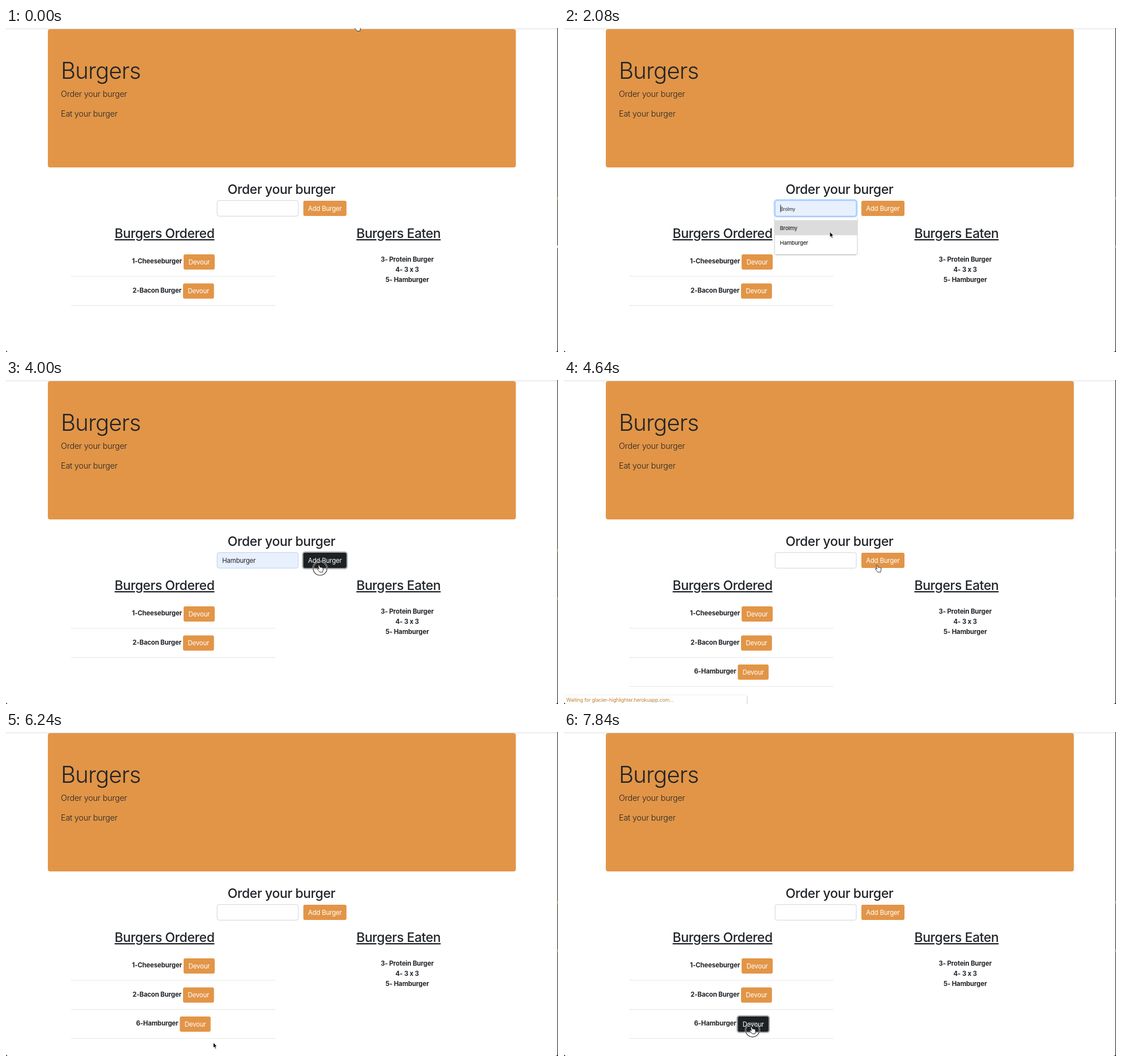
These frames come from a looping animation (976x574 px, 8000 ms). An HTML page:

```html
<!DOCTYPE html>
<html lang="en">
<head>
<meta charset="utf-8">
<title>Burgers</title>
<style>
html, body { margin: 0; width: 976px; height: 574px; overflow: hidden; background: #fff; }
svg { display: block; }
text { font: 400 11.5px Inter, "Open Sans", sans-serif; font-optical-sizing: none; letter-spacing: -.02em; fill: #212529; white-space: pre; }
.title { font-size: 40.3px; font-weight: 300; }
.lead { font-size: 14.4px; font-weight: 300; letter-spacing: -.013em; }
.head { font-size: 23.1px; font-weight: 500; }
.under { text-decoration: underline; }
.bold { font-weight: 700; letter-spacing: -.013em; }
.item { font-size: 9.6px; font-weight: 500; }
.status { font-size: 8.8px; fill: #c07f35; }
.mid { text-anchor: middle; }
.end { text-anchor: end; }
.button rect { fill: #e29547; }
.button text { fill: #fff; }
.button .glow { fill: none; stroke: #52585d; stroke-opacity: 0; stroke-width: 2.4; }
.button.focus .glow { stroke-opacity: .5; }
.button.down .face { fill: #1d2124; }
.box { fill: #fff; stroke: #ced4da; }
.box.filled { fill: #e8f0fe; stroke: #bdd2ee; }
.box.focus { stroke: #80bdff; }
</style>
</head>
<body>
<svg id="stage" width="976" height="574" viewBox="0 0 976 574"></svg>
<script>
const LOOP = 8000, STEP = 160;
const stage = document.getElementById("stage");
const $ = id => document.getElementById(id);

const text = (x, y, cls, str, id = "") => `<text id="${id}" x="${x}" y="${y}" class="${cls}">${str}</text>`;
const rect = (x, y, w, h, attrs = "") => `<rect x="${x}" y="${y}" width="${w}" height="${h}" ${attrs}/>`;

const buttons = {
  add: [525.7, 306, 76.3, 27, "Add Burger"],
  devour1: [314, 401, 55, 27, "Devour"],
  devour2: [313, 452.5, 54.7, 27, "Devour"],
  devour6: [307.3, 504, 54.5, 27, "Devour"]
};
const button = id => {
  const [x, y, w, h, label] = buttons[id];
  return `<g id="${id}" class="button">
    ${rect(x - 1, y - 1, w + 2, h + 2, 'rx="4" class="glow"')}
    ${rect(x, y, w, h, 'rx="3" class="face"')}
    ${text(x + w / 2, y + 17.7, "mid", label)}</g>`;
};
const row = (num, name, y) => {
  const id = "devour" + num;
  return `<g id="row${num}">${text(buttons[id][0] - 2.8, y + 16, "bold end", num + "-" + name)}
    ${button(id)}${rect(115, y + 38.5, 361, 1, 'fill="#e5e5e5"')}</g>`;
};

stage.innerHTML = `
  <defs><filter id="soft" x="-10%" y="-20%" width="120%" height="150%">
    <feDropShadow dx="0" dy="1" stdDeviation="1.6" flood-opacity=".4"/></filter></defs>
  ${rect(0, 0, 976, 574, 'fill="#fff"')}
  ${rect(0, 1, 976, 1, 'fill="#dedede"')}
  ${rect(74, 2, 827.5, 245, 'rx="4" fill="#e29547"')}
  ${text(97, 90, "title", "Burgers")}
  ${text(97, 122.3, "lead", "Order your burger")}
  ${text(97, 156.8, "lead", "Eat your burger")}
  ${text(487, 294, "head mid", "Order your burger")}
  ${rect(371.8, 304.3, 146.4, 30.4, 'id="halo" rx="5" fill="none" stroke="#bfdeff" stroke-width="2.4"')}
  ${rect(373.2, 305.7, 143.6, 27.6, 'id="box" rx="3.5"')}
  ${text(382.3, 324, "", "", "value")}
  ${rect(0, 313, 1, 13.5, 'id="caret" fill="#222"')}
  ${button("add")}
  ${text(280.3, 372, "head under mid", "Burgers Ordered")}
  ${text(694, 372, "head under mid", "Burgers Eaten")}
  ${row(1, "Cheeseburger", 401)}
  ${row(2, "Bacon Burger", 452.5)}
  ${row(6, "Hamburger", 504)}
  ${["3- Protein Burger", "4- 3 x 3", "5- Hamburger"].map((s, i) => text(709.3, 414.2 + 18 * i, "bold mid", s)).join("")}
  <g id="menu">
    ${rect(373, 335.5, 145, 65, 'rx="2" fill="#fff" filter="url(#soft)"')}
    ${rect(373, 340.5, 145, 26.7, 'id="mark" fill="#dcdcdc"')}
    ${text(381.7, 357.5, "item", "Brolmy")}
    ${text(381.7, 384.3, "item", "Hamburger")}
  </g>
  <g id="status">
    ${rect(-4, 558.5, 327, 20, 'rx="2" fill="#fff" filter="url(#soft)"')}
    ${text(4, 569.5, "status", "Waiting for glacier-highlighter.herokuapp.com...")}
  </g>
  ${rect(975, 0, 1, 574, 'fill="#16181a"')}
  ${rect(974, 299.5, 2, 4.5, 'fill="#e2a565"')}
  ${rect(974, 385.5, 2, 4, 'id="tick"')}
  <path d="M0 570Q0 574 4 574H0ZM976 569Q976 574 971 574H976Z"/>
  <g id="cursor">
    <g id="ring" fill="none">
      <circle cx="2.3" cy="5.7" r="12.3" stroke="#fff" stroke-opacity=".7" stroke-width="2.6"/>
      <circle cx="2.3" cy="5.7" r="12.3" stroke="#3a3029" stroke-width="1.2"/>
    </g>
    <path id="arrow" d="M0 0V9.6L2.1 7.7 3.7 11.3 5.3 10.6 3.8 7.1H6.6Z" fill="#000" stroke="#fff" stroke-width=".8"/>
    <path id="hand" d="M-1 .8Q.2-.6 1.2 .8L2.4 4.2 3.4 3.6 4.6 4.3 5.6 3.9 6.4 4.8 7.3 5 7.8 8 7 10.4V12.3H1.6L-.6 9.4-2.8 6.8Q-2.6 5.4-1 6L.4 7Z" fill="#fff" stroke="#222" stroke-width=".9" stroke-linejoin="round"/>
    <path id="beam" d="M-2-6Q0-6 0-4Q0-6 2-6M0-4V5M-2 7Q0 7 0 5Q0 7 2 7" fill="none" stroke="#222"/>
  </g>`;

// Pointer tip: time, x, y
const path = [
  [0, 619, -7], [1120, 470, 318], [1440, 470, 318], [2080, 470, 361], [2400, 467, 381],
  [2880, 467, 381], [3680, 553, 328], [4800, 553, 328], [5920, 370, 542],
  [6240, 366.5, 550], [7040, 331, 522.3], [LOOP, 331, 522.3]
];
const clicks = [1440, 2400, 4000, 7840];

function pointer(t) {
  const i = path.findIndex(p => p[0] > t);
  const [t0, x0, y0] = path[i - 1], [t1, x1, y1] = path[i];
  const u = (t - t0) / (t1 - t0), k = u * u * (3 - 2 * u);
  return [x0 + (x1 - x0) * k, y0 + (y1 - y0) * k];
}
const inside = (px, py, [x, y, w, h]) => px >= x && px <= x + w && py >= y && py <= y + h;
const show = (id, on) => $(id).style.display = on ? "" : "none";

function draw(t) {
  const during = (a, b) => t >= a && t < b;
  const [x, y] = pointer(t);

  const menu = during(1440, 2720), focus = during(1440, 4000);
  const hover = menu && y >= 340.5 ? (y < 367.2 ? "Brolmy" : "Hamburger") : "";
  const value = during(2720, 4640) ? "Hamburger" : hover;
  $("value").textContent = value;
  $("value").style.fontSize = menu ? "8.4px" : "";
  $("box").setAttribute("class", "box" + (value ? " filled" : "") + (focus ? " focus" : ""));
  show("halo", focus);
  show("caret", focus && (menu || Math.floor((t - 2720) / 500) % 2 === 0));
  $("caret").setAttribute("x", menu ? 382.5 : 441);

  show("menu", menu);
  show("mark", hover);
  $("mark").setAttribute("y", hover === "Hamburger" ? 367.2 : 340.5);

  $("add").classList.toggle("focus", during(4000, 4640));
  $("add").classList.toggle("down", during(4000, 4160));
  $("devour6").classList.toggle("focus", t >= 7840);
  $("devour6").classList.toggle("down", t >= 7840);
  show("row6", t >= 4640);
  show("status", during(4640, 4960));
  $("tick").setAttribute("fill", t < STEP ? "#fff" : "#e2a565");

  const hand = y < 0 || Object.values(buttons).some(b => inside(x, y, b));
  const beam = !hand && inside(x, y, [373, 305, 144, 29]);
  show("hand", hand);
  show("beam", beam);
  show("arrow", !hand && !beam);
  show("ring", clicks.some(c => during(c, c + STEP)));
  $("cursor").setAttribute("transform", `translate(${x} ${y})`);
}

function tick() {
  const t = performance.now() % LOOP;
  draw(Math.floor(t / STEP) * STEP);
  requestAnimationFrame(tick);
}
tick();
</script>
</body>
</html>
```
